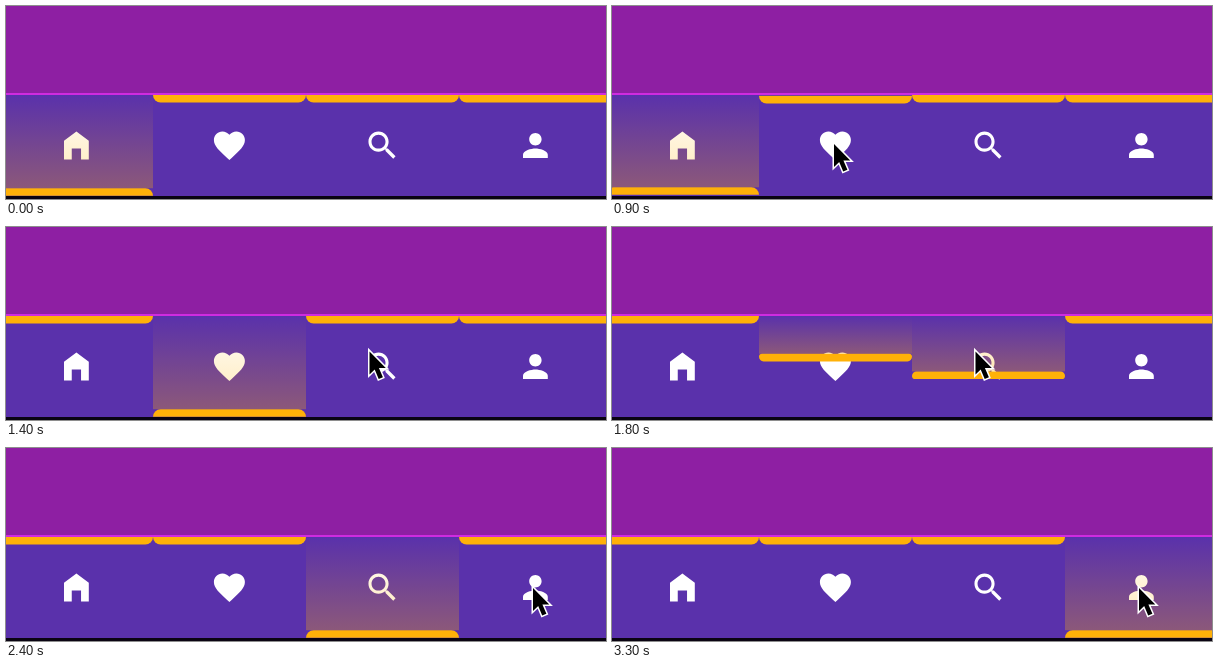
An HTML page with a canvas that plays this animation: 600x193 px, repeating every 3400 ms.

```html
<!DOCTYPE html>
<html lang="en">
<head>
<meta charset="utf-8">
<title>Tab bar</title>
<style>
  html, body { margin: 0; width: 100%; height: 100%; overflow: hidden; background: #8e1fa3; }
  canvas { display: block; }
</style>
</head>
<body>
<canvas id="stage" width="600" height="193"></canvas>
<script>
const ctx = document.getElementById('stage').getContext('2d');
const LOOP = 3400, STEP = 100;
const TAB_WIDTH = 153, FIRST_X = -6;
const BAR_TOP = 89, BAR_END = 182.2, BAR_HEIGHT = 7.6;
const SLIDE_MS = 500;
const SLIDE_STARTS = [890, 1628, 2604];

const icons = [
  'M12 3L4 9v12h5v-7h6v7h5V9z',
  'M12 21.35l-1.45-1.32C5.4 15.36 2 12.28 2 8.5 2 5.42 4.42 3 7.5 3c1.74 0 3.41.81 4.5 2.09C13.09 3.81 14.76 3 16.5 3 19.58 3 22 5.42 22 8.5c0 3.78-3.4 6.86-8.55 11.54z',
  'M15.5 14h-.79l-.28-.27C15.41 12.59 16 11.11 16 9.5 16 5.91 13.09 3 9.5 3S3 5.91 3 9.5 5.91 16 9.5 16c1.61 0 3.09-.59 4.23-1.57l.27.28v.79l5 4.99L20.49 19zM9.5 14C7.01 14 5 11.99 5 9.5S7.01 5 9.5 5 14 7.01 14 9.5 11.99 14 9.5 14z',
  'M12 12c2.21 0 4-1.79 4-4s-1.79-4-4-4-4 1.79-4 4 1.79 4 4 4zm0 2c-2.67 0-8 1.34-8 4v2h16v-2c0-2.66-5.33-4-8-4z'
].map(d => new Path2D(d));
const arrow = new Path2D('M0 0V23L5.2 18 9.2 27.6 13.4 25.8 9.4 16.4H16.3Z');

const pointerKeys = [
  { t: 50, x: 612, y: 150 },
  { t: 600, x: 222, y: 138 },
  { t: 1050, x: 222, y: 138 },
  { t: 1390, x: 363.5, y: 124.5 },
  { t: 2080, x: 363.5, y: 124.5 },
  { t: 2390, x: 527, y: 140 }
];

const clamp = v => Math.min(1, Math.max(0, v));
const smooth = v => v * v * (3 - 2 * v);
const mix = (a, b, k) => a + (b - a) * k;

// cubic-bezier(.25, .1, .25, 1)
function ease(x) {
  if (x <= 0 || x >= 1) return clamp(x);
  const curve = (a, b, s) => 3 * a * s * (1 - s) ** 2 + 3 * b * s * s * (1 - s) + s ** 3;
  let lo = 0, hi = 1;
  for (let i = 0; i < 24; i++) {
    const mid = (lo + hi) / 2;
    if (curve(.25, .25, mid) < x) lo = mid; else hi = mid;
  }
  return curve(.1, 1, lo);
}

function openness(tab, time) {
  const slide = i => ease((time - SLIDE_STARTS[i]) / SLIDE_MS);
  const opened = tab === 0 ? 1 : slide(tab - 1);
  const closed = tab === 3 ? 0 : slide(tab);
  return opened - closed;
}

function rect(color, x, y, w, h) {
  ctx.fillStyle = color;
  ctx.fillRect(x, y, w, h);
}

function drawTab(tab, time) {
  const x = FIRST_X + tab * TAB_WIDTH;
  const p = openness(tab, time);
  const y = mix(BAR_TOP, BAR_END, p);

  ctx.save();
  ctx.translate(x + TAB_WIDTH / 2 - .1, 139.5);
  ctx.scale(1.55, 1.55);
  ctx.translate(-12, -12);
  ctx.fillStyle = '#fff';
  ctx.fill(icons[tab], 'evenodd');
  ctx.restore();

  if (p > 0) {
    const glow = ctx.createLinearGradient(0, BAR_TOP, 0, y);
    glow.addColorStop(0, 'rgba(255,179,8,0)');
    glow.addColorStop(1, 'rgba(255,179,8,.3)');
    rect(glow, x, BAR_TOP, TAB_WIDTH, y - BAR_TOP);
  }

  const top = BAR_HEIGHT * p, bottom = BAR_HEIGHT - top;
  ctx.fillStyle = '#ffb108';
  ctx.beginPath();
  ctx.roundRect(x, y, TAB_WIDTH, BAR_HEIGHT, [top, top, bottom, bottom]);
  ctx.fill();
}

function drawPointer(time) {
  if (time < pointerKeys[0].t) return;
  const next = pointerKeys.findIndex(k => k.t > time);
  const b = pointerKeys.at(next);
  const a = next < 0 ? b : pointerKeys[next - 1];
  const k = a === b ? 1 : smooth((time - a.t) / (b.t - a.t));
  ctx.save();
  ctx.translate(mix(a.x, b.x, k), mix(a.y, b.y, k));
  ctx.lineWidth = 3;
  ctx.strokeStyle = '#fff';
  ctx.stroke(arrow);
  ctx.fillStyle = '#000';
  ctx.fill(arrow);
  ctx.restore();
}

function draw(time) {
  rect('#8e1fa3', 0, 0, 600, 88);
  rect('#5a31ab', 0, 88, 600, 102);
  for (let tab = 0; tab < 4; tab++) drawTab(tab, time);
  rect('#cf2be0', 0, 87, 600, 2);
  rect('#0a0412', 0, 190, 600, 3);
  drawPointer(time);
}

const start = performance.now();
function tick() {
  const elapsed = (performance.now() - start) % LOOP;
  draw(Math.floor(elapsed / STEP) * STEP);
  requestAnimationFrame(tick);
}
tick();
</script>
</body>
</html>
```
